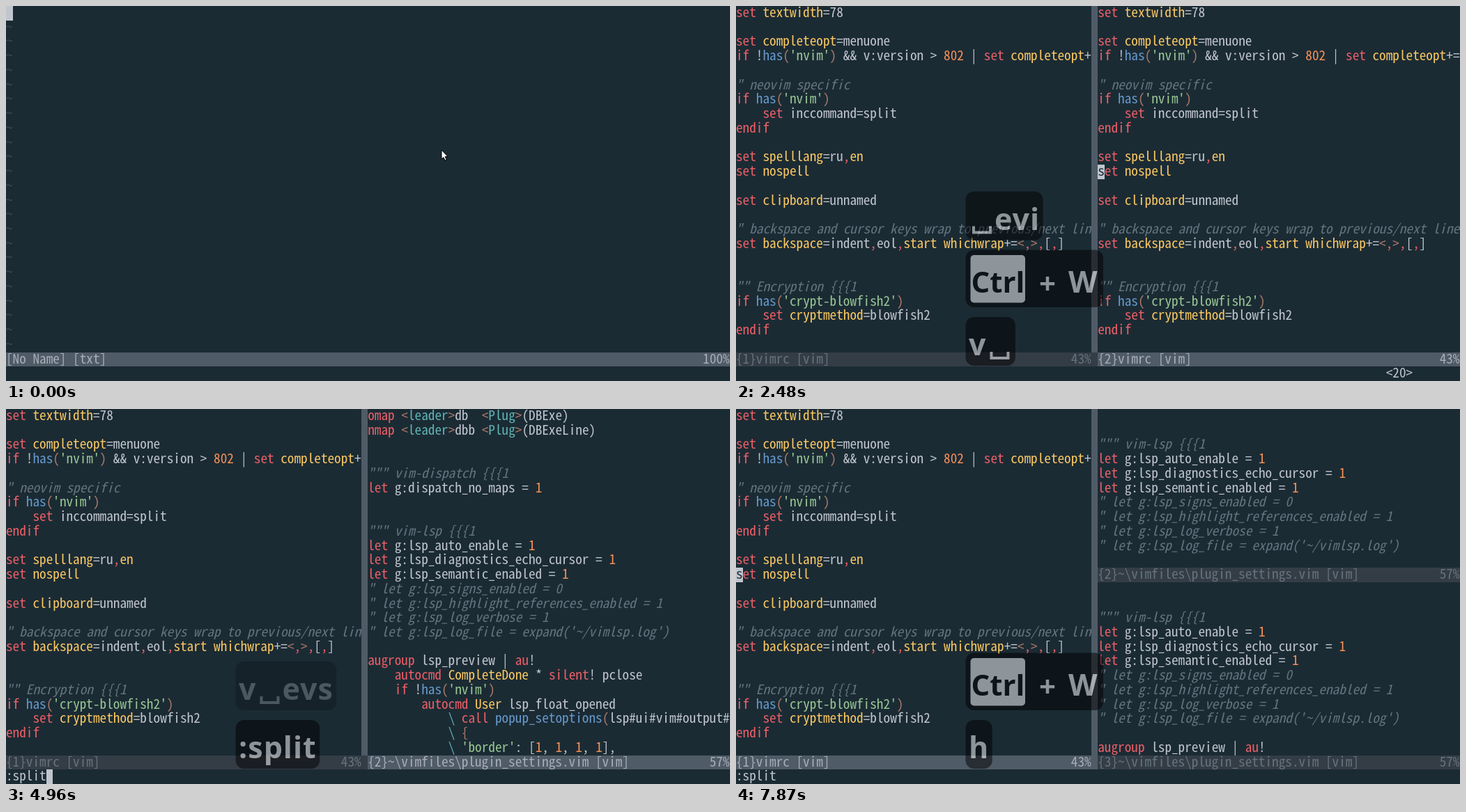
These frames come from a looping animation (1039 px wide and 539 px high, 8 s). An HTML page with a canvas:

```html
<!DOCTYPE html>
<html lang="en">
<head>
<meta charset="utf-8">
<title>Editor windows</title>
<style>
html, body { margin: 0; width: 1039px; height: 539px; overflow: hidden; background: #1b2b34; }
canvas { display: block; }
</style>
</head>
<body>
<canvas id="stage" width="1039" height="539"></canvas>
<script>
const ctx = document.getElementById('stage').getContext('2d');
const LOOP = 8000, COLS = 108, W = 1039, H = 539, CW = 1038.5 / COLS, RH = H / 26;
const MONO = '"Noto Sans Mono CJK JP", "Noto Sans Mono", monospace';
const SANS = '"Open Sans", "Noto Sans", sans-serif';
const C = {
  bg: '#1b2b34', fg: '#c0c5ce', red: '#ec5f67', orange: '#f99157', yellow: '#fac863',
  green: '#99c794', cyan: '#5fb3b3', blue: '#6699cc', brown: '#ab7967',
  comment: '#65737e', dim: '#3d4c56', bar: '#4f5b66', barText: '#a7adba', barOff: '#343d46'
};

// Font size whose natural advance equals one terminal cell
ctx.font = `100px ${MONO}`;
const SIZE = 100 * CW / ctx.measureText('0').width;

const VIMRC = `set textwidth=78

set completeopt=menuone
if !has('nvim') && v:version > 802 | set completeopt+=popup | endif

" neovim specific
if has('nvim')
    set inccommand=split
endif

set spelllang=ru,en
set nospell

set clipboard=unnamed

" backspace and cursor keys wrap to previous/next line
set backspace=indent,eol,start whichwrap+=<,>,[,]


"" Encryption {{{1
if has('crypt-blowfish2')
    set cryptmethod=blowfish2
endif
`.split('\n');

const PLUGINS = String.raw`omap <leader>db  <Plug>(DBExe)
nmap <leader>dbb <Plug>(DBExeLine)


""" vim-dispatch {{{1
let g:dispatch_no_maps = 1


""" vim-lsp {{{1
let g:lsp_auto_enable = 1
let g:lsp_diagnostics_echo_cursor = 1
let g:lsp_semantic_enabled = 1
" let g:lsp_signs_enabled = 0
" let g:lsp_highlight_references_enabled = 1
" let g:lsp_log_verbose = 1
" let g:lsp_log_file = expand('~/vimlsp.log')

augroup lsp_preview | au!
    autocmd CompleteDone * silent! pclose
    if !has('nvim')
        autocmd User lsp_float_opened
            \ call popup_setoptions(lsp#ui#vim#output#
            \ {
            \ 'border': [1, 1, 1, 1],`.split('\n');

const RULES = [
  ['green', /'[^']*'/],
  ['red', /\b(?:set|if|endif|let|omap|nmap|augroup|autocmd|call|silent|au)\b|,(?! |$)|(?<=popup )\|/],
  ['yellow', /\b(?:textwidth|completeopt|spelllang|nospell|clipboard|backspace|whichwrap|cryptmethod|start|en|CompleteDone|User)\b/],
  ['blue', /\b(?:has|popup_setoptions)\b/],
  ['cyan', /\b(?:leader|Plug)\b|\\/],
  ['orange', /(?<!=)\b\d+\b/],
  ['brown', /\((?!DB)|(?<!Exe|Line)\)|<|>(?! )|\{/]
];
const LEXER = new RegExp(RULES.map(([, r]) => `(${r.source})`).join('|'), 'g');

function tokens(line) {
  if (line.startsWith('"')) return [[0, line, 'comment']];
  const out = [];
  let last = 0;
  for (const m of line.matchAll(LEXER)) {
    out.push([last, line.slice(last, m.index), 'fg']);
    out.push([m.index, m[0], RULES[m.slice(1).findIndex(Boolean)][0]]);
    last = m.index + m[0].length;
  }
  out.push([last, line.slice(last), 'fg']);
  return out;
}

function rect(col, row, cols, rows, color) {
  const x = Math.round(col * CW), y = Math.round(row * RH);
  ctx.fillStyle = color;
  ctx.fillRect(x, y, Math.round((col + cols) * CW) - x, Math.round((row + rows) * RH) - y);
}

function put(col, row, text, color = C.fg, italic = false) {
  ctx.font = `${italic ? 'italic ' : ''}${SIZE}px ${MONO}`;
  ctx.fillStyle = color;
  ctx.fillText(text, col * CW, row * RH + 16);
}

function pane(lines, col, cols, row, rows, first = 0) {
  lines.slice(first, first + rows).forEach((line, i) => {
    for (const [at, text, color] of tokens(line.slice(0, cols)))
      put(col + at, row + i, text, C[color], color === 'comment');
  });
}

function status(col, cols, row, name, percent, active, textCols = cols) {
  const color = active ? C.barText : C.comment;
  rect(col, row, cols, 1, active ? C.bar : C.barOff);
  put(col, row, name, color);
  put(col + textCols - percent.length, row, percent, color);
}

function cursor(col, row, char = '') {
  rect(col, row, 1, 1, C.fg);
  put(col, row, char, C.bg);
}

const within = (t, a, b) => t >= a && t < b;
const latest = (t, steps) => steps.reduce((v, [at, value]) => t >= at ? value : v, '');
const typed = (t, text, times) => text.slice(0, times.filter(at => t >= at).length);

const SHOWCMD = [
  [80, '<20>'], [300, '<20>e'], [400, '<20>ev'], [500, ''], [1560, '^W'], [1840, ''],
  [2480, '<20>'], [2580, '<20>e'], [2780, '<20>ev'], [2890, ''], [6380, '^W'], [6920, '']
];
const COMMAND = [
  [500, '"~\\vimfiles\\vimrc" [unix] 255L, 7004C'], [830, ''],
  [2890, '"~\\vimfiles\\plugin_settings.vim" [unix] 317L, 9112C'], [3040, ''],
  [3960, ':'], [4310, ':s'], [4410, ':sp'], [4600, ':spl'], [4750, ':spli'], [4900, ':split']
];

function drawWindows(t) {
  if (t < 830) {
    for (let row = 1; row < 24; row++) put(0, row, '~', C.dim);
    status(0, COLS, 24, '[No Name] [txt]', '100%', true);
    if (t < 500) cursor(0, 0);
    return;
  }
  if (t < 1840) {
    pane(VIMRC, 0, COLS, 0, 24);
    status(0, COLS, 24, 'vimrc [vim]', '43%', true);
    if (t >= 880) cursor(0, 11, 's');
    return;
  }
  const left = t >= 6920, settings = '~\\vimfiles\\plugin_settings.vim [vim]';
  pane(VIMRC, 0, 53, 0, 24);
  rect(53, 0, 1, 24, C.bar);
  status(0, 54, 24, '{1}vimrc [vim]', '43%', left, 53);
  if (t < 3040) {
    pane(VIMRC, 54, 54, 0, 24);
    status(54, 54, 24, '{2}vimrc [vim]', '43%', true);
    if (t < 2890) cursor(54, 11, 's');
  } else if (t < 5140) {
    pane(PLUGINS, 54, 54, 0, 24);
    status(54, 54, 24, '{2}' + settings, '57%', true);
    if (t < 3740) cursor(54, 11, 'l');
  } else {
    pane(PLUGINS, 54, 54, 0, 11, 6);
    status(54, 54, 11, '{2}' + settings, '57%', false);
    pane(PLUGINS, 54, 54, 12, 12, 6);
    status(54, 54, 24, '{3}' + settings, '57%', !left);
    if (!left && !within(t, 5830, 6060)) cursor(54, 17, 'l');
    if (left && !within(t, 7610, 7870)) cursor(0, 11, 's');
  }
}

// Key popups, oldest first; each fades out from `end`
const POPUPS = [
  { keys: '␣evi', at: [300, 300, 400, 500], end: 2480 },
  { keys: '^', at: [1560], end: 3620 },
  { keys: 'v␣evs', at: [1840, 2480, 2580, 2780, 2890], end: 4880 },
  { keys: ':split⏎', at: [3960, 4310, 4410, 4600, 4750, 4900, 5000], end: 7110 },
  { keys: '^', at: [6380], end: Infinity },
  { keys: 'h', at: [6880], end: Infinity }
];
const LEFT = 329.5, FADE = 140;

function box(x, y, w, h, r) {
  ctx.beginPath();
  ctx.roundRect(x, y, w, h, r);
  ctx.fill();
}

function label(text, x, y, size = 43) {
  ctx.font = `bold ${size}px ${SANS}`;
  ctx.fillText(text, x, y);
}

function popup(keys, bottom, alpha) {
  const ctrl = keys === '^', tall = ctrl || keys.includes('⏎');
  const h = tall ? 82.5 : 70, top = bottom - h, base = top + (tall ? 61 : 55);
  const parts = keys.split(/([␣⏎])/).filter(Boolean);
  ctx.save();
  ctx.font = `bold 43px ${SANS}`;
  if (!ctrl) ctx.letterSpacing = '1px';
  const widthOf = p => p === '␣' ? 37 : p === '⏎' ? 35 : ctx.measureText(p).width;
  const w = ctrl ? 197.5 : parts.reduce((sum, p) => sum + widthOf(p), 9);
  ctx.fillStyle = `rgba(0,0,0,${alpha / 2})`;
  box(LEFT, top, w, h, 12);

  // White ink is added to the darkened backdrop; black ink on caps subtracts it again
  const level = Math.round(128 * alpha);
  ctx.fillStyle = ctx.strokeStyle = `rgb(${level},${level},${level})`;
  const ink = mode => ctx.globalCompositeOperation = mode;
  ink('lighter');
  if (ctrl) {
    box(336.5, top + 7.5, 78.5, 68.5, 5);
    label('W', 477, base);
    ctx.textAlign = 'center';
    label('+', 447, base + 2, 42);
    ink('difference');
    label('Ctrl', 376, base, 42);
  } else {
    let x = LEFT + 4.5;
    for (const p of parts) {
      if (p === '␣') {
        ctx.lineWidth = 4;
        ctx.beginPath();
        ctx.moveTo(x + 7, top + 50);
        ctx.lineTo(x + 7, top + 59);
        ctx.lineTo(x + 31, top + 59);
        ctx.lineTo(x + 31, top + 50);
        ctx.stroke();
      } else if (p === '⏎') {
        const cap = x + 3, y = top + 51;
        box(cap, top + 7.5, 29, 68.5, 5);
        ink('difference');
        ctx.beginPath();
        [[5, 0], [12, -6], [12, -2], [19, -2], [19, -11], [23, -11], [23, 2], [12, 2], [12, 6]]
          .forEach(([dx, dy]) => ctx.lineTo(cap + dx, y + dy));
        ctx.fill();
        ink('lighter');
      } else label(p, x, base);
      x += widthOf(p);
    }
  }
  ctx.restore();
  return h;
}

function drawPopups(t) {
  let bottom = 517;
  for (const p of [...POPUPS].reverse()) {
    const alpha = Math.min(1, 1 - (t - p.end) / FADE);
    if (t < p.at[0] || alpha <= 0) continue;
    bottom -= popup(typed(t, p.keys, p.at), bottom, alpha) + 14;
  }
}

function drawMouse() {
  ctx.beginPath();
  [[0, 0], [0, 13], [3, 10.5], [5, 15], [7.2, 14], [5.2, 9.6], [9, 9.4]]
    .forEach(([x, y]) => ctx.lineTo(625 + x, 207 + y));
  ctx.closePath();
  ctx.fillStyle = '#fff';
  ctx.strokeStyle = '#000';
  ctx.lineWidth = 1;
  ctx.fill();
  ctx.stroke();
}

function draw(t) {
  ctx.fillStyle = C.bg;
  ctx.fillRect(0, 0, W, H);
  drawWindows(t);
  const command = latest(t, COMMAND);
  put(0, 25, command);
  if (within(t, 3960, 5000)) cursor(command.length, 25);
  put(97, 25, latest(t, SHOWCMD));
  drawPopups(t);
  if (t < 80) drawMouse();
}

const start = performance.now();
function tick(now) {
  draw(Math.max(0, now - start) % LOOP);
  requestAnimationFrame(tick);
}
draw(0);
requestAnimationFrame(tick);
</script>
</body>
</html>
```
